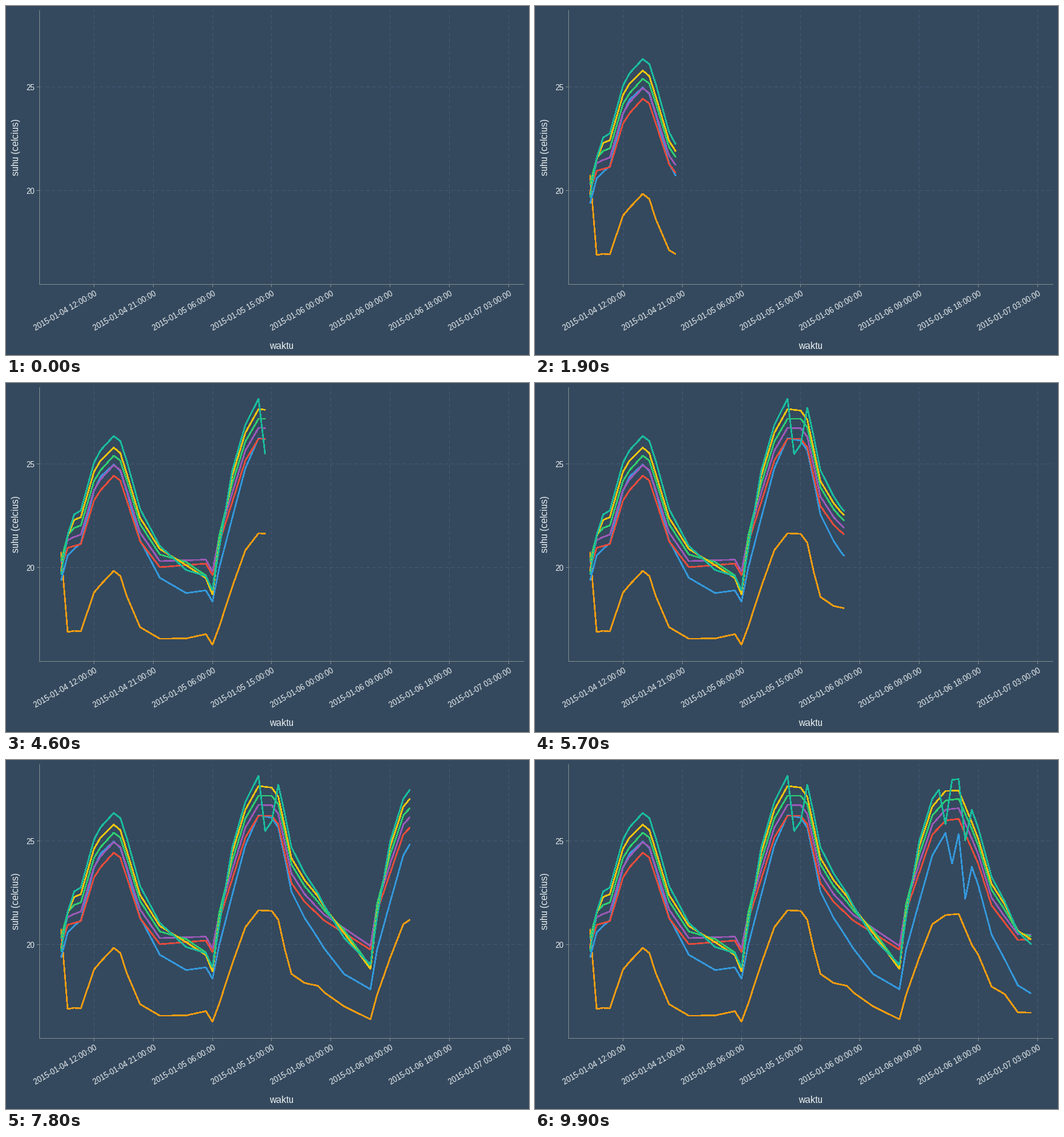
Recreate the animation shown at these times as a matplotlib script. Size 864 by 576 pixels, loop 10 s.

```python
import matplotlib.pyplot as plt
import numpy as np
from matplotlib.animation import FuncAnimation

W, H, DPI = 864, 576, 96
FRAMES, HOURS = 100, 68
PX = 72 / DPI
BG, INK, GRID, AXIS = "#34495e", "#ecf0f1", "#465775", "#7f8c8d"
LEFT, RIGHT, TOP, BOTTOM = 55.5, 856, 7, 459.5
X0, HOUR_W = 91, 10.873

plt.rcParams["font.family"] = "Liberation Sans"
plt.rcParams["text.hinting"] = "native"
plt.rcParams["text.hinting_factor"] = 1
fig = plt.figure(figsize=(W / DPI, H / DPI), dpi=DPI, facecolor=BG)
ax = fig.add_axes([0, 0, 1, 1])
ax.set_xlim(0, W)
ax.set_ylim(H, 0)
ax.axis("off")


def rule(x1, y1, x2, y2, color, dashes="-"):
    ax.plot([x1, x2], [y1, y2], color=color, lw=PX, ls=dashes, snap=False,
            antialiased=False, solid_capstyle="butt", dash_capstyle="butt")


def label(x, y, text, size, ha="center", angle=0):
    ax.text(x, y, text, color=INK, fontsize=size * PX, ha=ha, va="baseline",
            rotation=angle, rotation_mode="anchor")


DASH = (0, (5, 4))
for temp, y in ((25, 133.5), (20, 304.5)):
    rule(LEFT, y, RIGHT, y, GRID, DASH)
    rule(LEFT - 4, y, LEFT, y, AXIS)
    label(47.5, y + 5.8, str(temp), 13, "right")

for i in range(8):
    hour = 12 + 9 * i
    x = np.floor(X0 + (hour - 7) * HOUR_W) + 0.5
    rule(x, BOTTOM, x, TOP, GRID, DASH)
    rule(x, BOTTOM, x, BOTTOM + 4, AXIS)
    stamp = f"2015-01-{4 + hour // 24:02d} {hour % 24:02d}:00:00"
    label(x + 6, 477.5, stamp, 13, "right", 30)

rule(LEFT, TOP, LEFT, BOTTOM, AXIS)
rule(LEFT, BOTTOM, RIGHT, BOTTOM, AXIS)
label(455.5, 566, "waktu", 16)
label(21, 233.5, "suhu (celcius)", 16, angle=90)

hours = np.arange(HOURS)
xs = X0 + HOUR_W * hours
# each hourly reading lands on its nearest animation step
marks = np.floor(hours * (FRAMES - 1) / (HOURS - 1) + 0.5).astype(int)

# turning points (hour, height) of the three-day cycle all sensors share
turns = [(0, 306), (1, 272), (3, 266), (5, 194), (6, 177), (8, 153), (9, 161),
         (12, 261), (15, 304), (22, 298), (23, 317), (24, 265), (28, 128),
         (30, 92), (32, 92), (33, 106), (35, 203), (37, 234), (40, 265),
         (47, 313), (48, 250), (52, 123), (54, 100), (56, 97), (59, 172),
         (61, 240), (65, 297), (67, 296)]
base = np.interp(hours, *zip(*turns))
PHASES = (0, 2, 6, 10, 15, 19, 23)
series = []


def sensor(color, lift=(0,) * 7, drift=0, dips=()):
    """Add a curve lifted off the base by time of day, with sudden dips."""
    ys = base - np.interp(hours % 24, PHASES, lift) - drift * hours
    for hour, depth in dips:
        ys[hour] += depth
    line, = ax.plot([], [], color=color, lw=1.6 * PX, antialiased=False,
                    solid_capstyle="butt", solid_joinstyle="round")
    series.append((line, ys))


sensor("#f39c12", (-138, -140, -156, -158, -118, -121, -115), dips=[(0, -165)])
sensor("#3498db", (-20, -3, 28, 23, -4, -29, -23), -0.9, [(55, 50), (57, 80)])
sensor("#e74c3c")
sensor("#9b59b6", (10, 15, 18, 17, 10, 8, 6))
sensor("#2ecc71", (12, 30, 33, 33, 21, 5, -28))
sensor("#f1c40f", (-5, 43, 49, 44, 30, 0, -32))
sensor("#1abc9c", (-10, 52, 66, 65, 35, -8, -25),
       dips=[(31, 91), (32, 75), (54, 72), (57, 76)])


def draw(n):
    last = np.searchsorted(marks, n, side="right") - 1
    tip_x = X0 + n / (FRAMES - 1) * (xs[-1] - X0)
    for line, ys in series:
        px, py = xs[:last + 1], ys[:last + 1]
        if n == 0:
            px, py = [], []
        elif marks[last] != n:
            px = np.append(px, tip_x)
            py = np.append(py, np.interp(n, marks, ys))
        line.set_data(px, py)
    return [line for line, _ in series]


anim = FuncAnimation(fig, draw, frames=FRAMES, interval=100,
                     repeat=True, repeat_delay=0, blit=False)
plt.show()
```
